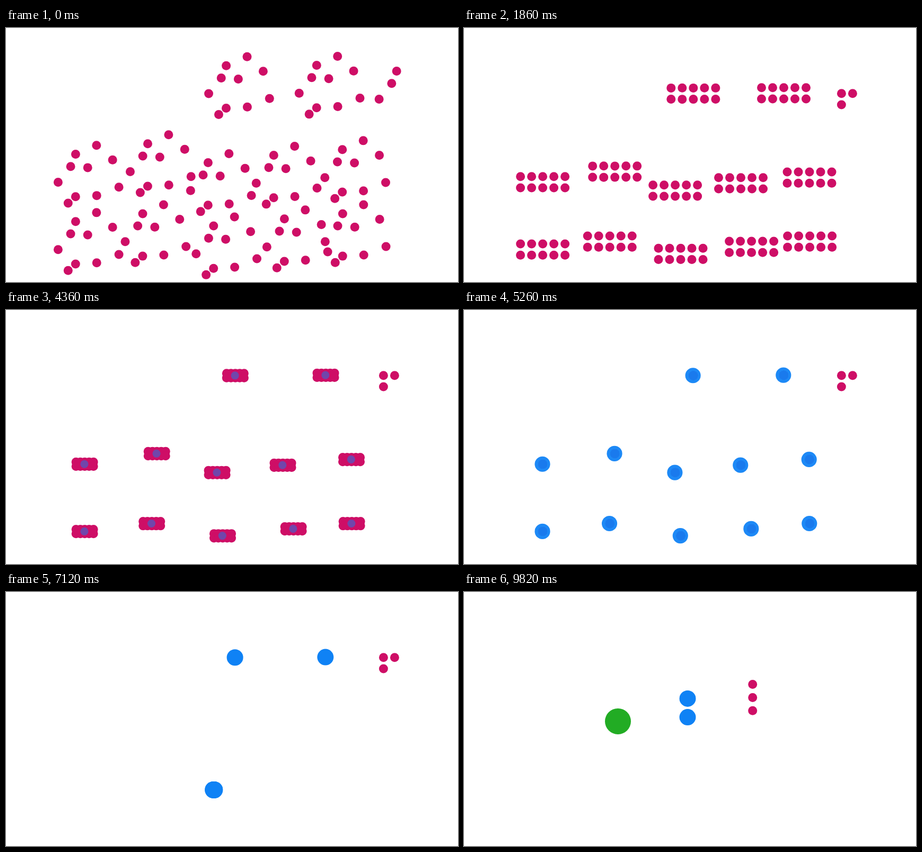
Animation, 853 px wide and 480 px high, one loop 9.88 s. Source, as an HTML page with a canvas:

```html
<!DOCTYPE html>
<html lang="en">
<head>
<meta charset="utf-8">
<title>Grouping dots by ten</title>
<style>
  html, body { margin: 0; width: 100%; height: 100%; overflow: hidden; background: #fff; }
  canvas { display: block; }
</style>
</head>
<body>
<canvas id="stage" width="853" height="480"></canvas>
<script>
const ctx = document.getElementById('stage').getContext('2d');
const LOOP = 9880;
const PINK = '#ce0e66', BLUE = '#0f82f5', GREEN = '#22ac24';
const ONE = 8.5, TEN = 15.5, HUNDRED = 24.5;

// Key points: the group centres, and the one scattered shape every group starts from.
const stayingTens = [[432.8, 124], [603.5, 123.3]];
const mergingTens = [
  [148.6, 291.4], [284.7, 271.5], [398.6, 307.3], [522.5, 293.3], [652, 282.6],
  [148.6, 418.6], [275.2, 403.7], [409, 426.8], [542.6, 413.6], [652.6, 403.7]
];
const looseGroup = [754.4, 134.4];
const looseSlots = [1, 0, 5];
const scatter = [
  [-26.5, -29.7], [-17.2, -53], [5.6, -27.6], [22.2, -70], [52.6, -42.3],
  [-50.3, 0], [-31.4, 39.7], [-17.4, 27.5], [22.6, 25.3], [64.6, 9.3]
];
const mergePoint = [392.2, 374], hundredEnd = [290.5, 244.4];

const add = (a, b) => [a[0] + b[0], a[1] + b[1]];
const mix = (a, b, p) => a.map((v, i) => v + (b[i] - v) * p);
const slot = i => [(i % 5 - 2) * 21, i < 5 ? -10.6 : 10.6];
const progress = (t, start, length) => Math.min(1, Math.max(0, (t - start) / length));
const smooth = p => p < 0.5 ? 2 * p * p : 1 - 2 * (1 - p) ** 2;
const glide = (t, start, length = 2000) => smooth(progress(t, start, length));

function dot([x, y], radius, color, alpha = 1) {
  ctx.globalAlpha = alpha;
  ctx.fillStyle = color;
  ctx.beginPath();
  ctx.arc(x, y, radius, 0, Math.PI * 2);
  ctx.fill();
}

// Fades in while growing from nothing.
const zoomDot = (place, radius, color, p) => dot(place, radius * p, color, p);

function draw(t) {
  const arrange = glide(t, -95);
  const gather = glide(t, 3248);
  const tenGrow = progress(t, 3390, 1990);
  const merge = glide(t, 5230);
  const hundredGrow = progress(t, 7240, 900);
  const lineUp = glide(t, 8122, 1500);
  const offset = i => mix(scatter[i], slot(i), arrange);

  function ten(center, end, travel) {
    if (tenGrow < 1) {
      scatter.forEach((_, i) => dot(add(center, mix(offset(i), [0, 0], gather)), ONE, PINK));
    }
    zoomDot(mix(add(center, [-0.7, -0.2]), end, travel), TEN, BLUE, tenGrow);
  }

  ctx.clearRect(0, 0, 853, 480);
  stayingTens.forEach((center, i) => ten(center, [422, 201.4 + 35.2 * i], lineUp));
  if (hundredGrow < 1) mergingTens.forEach(center => ten(center, mergePoint, merge));
  looseSlots.forEach((s, i) => {
    dot(mix(add(looseGroup, offset(s)), [544.7, 174.6 + 24.8 * i], lineUp), ONE, PINK);
  });
  zoomDot(mix(mergePoint, hundredEnd, lineUp), HUNDRED, GREEN, hundredGrow);
}

const began = performance.now();
function tick() {
  draw((performance.now() - began) % LOOP);
  requestAnimationFrame(tick);
}
tick();
</script>
</body>
</html>
```
